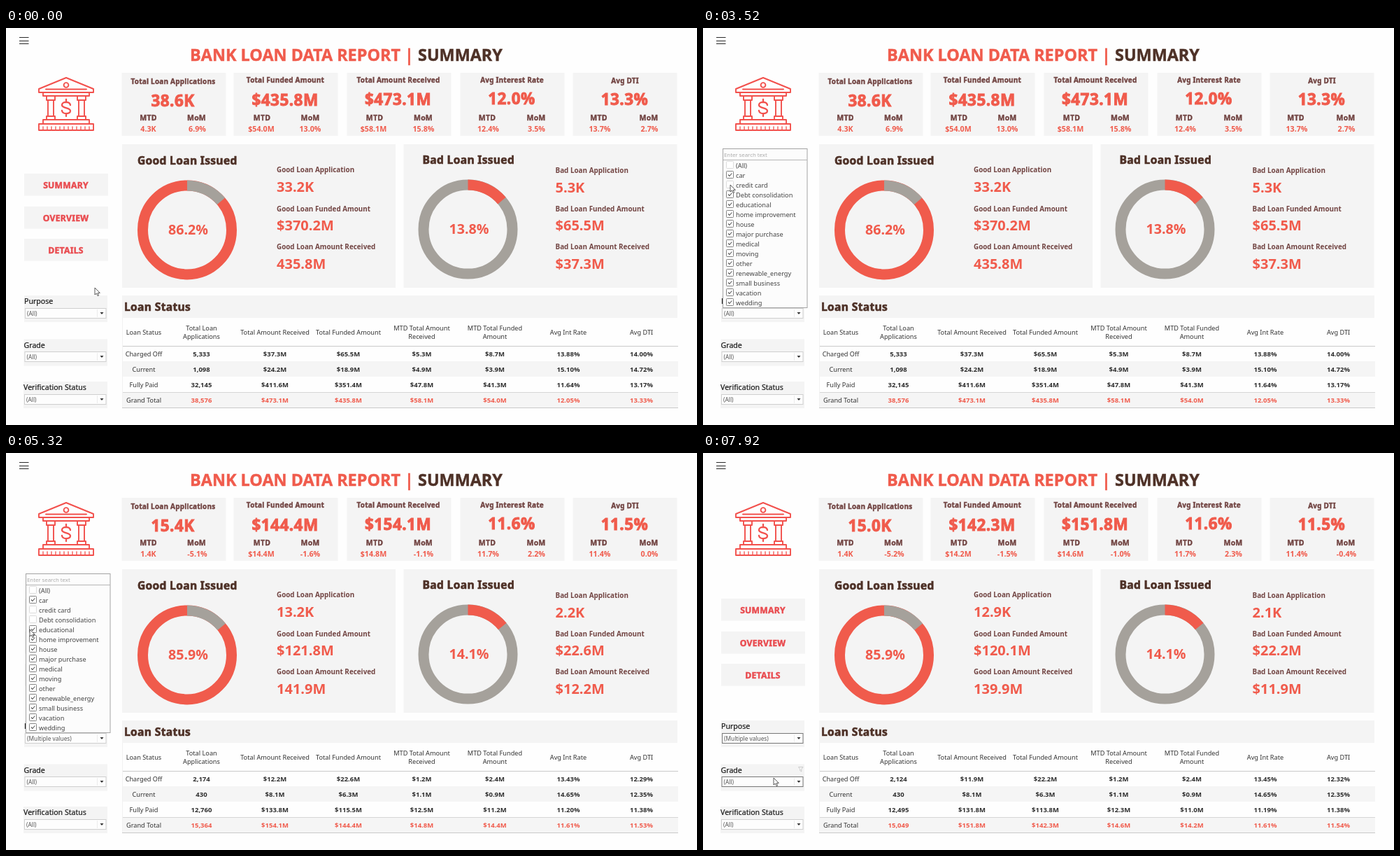
An HTML page for the animation above (7.99 s loop, 988 by 567 pixels).

```html
<!DOCTYPE html>
<html lang="en">
<head>
<meta charset="utf-8">
<title>Bank loan data report</title>
<style>
  html, body { margin: 0; width: 100%; height: 100%; overflow: hidden; background: #fefefe; }
  svg { display: block; width: 100vw; height: 100vh; }
  text { font-family: "Noto Sans", "Open Sans", sans-serif; white-space: pre; }
  .medium { stroke: currentColor; stroke-width: .2px; }
  .semi { font-weight: 600; }
  .bold { font-weight: 700; }
  .heavy { font-weight: 700; stroke: currentColor; stroke-width: .042em; letter-spacing: .02em; }
  .title { font-weight: 700; stroke: currentColor; stroke-width: .02em; }
</style>
</head>
<body>
<svg id="stage" viewBox="0 0 988 567"></svg>
<script>
const LOOP = 7990;
const RED = '#f05b4c', BROWN = '#4e3127', PLUM = '#724543', PANEL = '#f4f4f4', GRAY = '#a5a19b';
const stage = document.getElementById('stage');

function add(tag, attrs, parent = stage) {
  const el = document.createElementNS('http://www.w3.org/2000/svg', tag);
  for (const key in attrs) el.setAttribute(key, attrs[key]);
  parent.append(el);
  return el;
}

const rect = (x, y, width, height, fill, parent, more) =>
  add('rect', { x, y, width, height, fill, ...more }, parent);

const line = (d, stroke, width = 1, parent = stage) =>
  add('path', { d, stroke, 'stroke-width': width, fill: 'none' }, parent);

// y is the middle of the capitals
function label(str, x, y, size, color, { weight = '', anchor = 'middle', parent } = {}) {
  const el = add('text', {
    x, y: y + size * 0.357, 'font-size': size, fill: color, color,
    class: weight, 'text-anchor': anchor
  }, parent);
  el.textContent = str;
  return el;
}

const show = (el, on) => el.setAttribute('visibility', on ? 'visible' : 'hidden');

// ---- data: figures shown for each filter selection
const parse = s => s.trim().split(/\s+/);
const states = [
  { cards: '38.6K 4.3K 6.9% $435.8M $54.0M 13.0% $473.1M $58.1M 15.8% 12.0% 12.4% 3.5% 13.3% 13.7% 2.7%',
    loans: '86.2% 33.2K $370.2M 435.8M 13.8% 5.3K $65.5M $37.3M',
    table: `5,333 $37.3M $65.5M $5.3M $8.7M 13.88% 14.00%
            1,098 $24.2M $18.9M $4.9M $3.9M 15.10% 14.72%
            32,145 $411.6M $351.4M $47.8M $41.3M 11.64% 13.17%
            38,576 $473.1M $435.8M $58.1M $54.0M 12.05% 13.33%` },
  { cards: '33.6K 3.5K 1.4% $376.9M $43.7M 6.2% $407.9M $46.6M 8.2% 12.1% 12.3% 2.6% 13.1% 13.4% 2.5%',
    loans: '85.6% 28.8K $318.0M 374.6M 14.4% 4.8K $58.8M $33.2M',
    table: `4,825 $33.2M $58.8M $4.4M $7.3M 13.92% 13.86%
            997 $21.7M $16.9M $4.0M $3.2M 15.06% 14.51%
            27,756 $352.9M $301.1M $38.2M $33.2M 11.67% 12.96%
            33,578 $407.9M $376.9M $46.6M $43.7M 12.10% 13.13%` },
  { cards: '15.4K 1.4K -5.1% $144.4M $14.4M -1.6% $154.1M $14.8M -1.1% 11.6% 11.7% 2.2% 11.5% 11.4% 0.0%',
    loans: '85.9% 13.2K $121.8M 141.9M 14.1% 2.2K $22.6M $12.2M',
    table: `2,174 $12.2M $22.6M $1.2M $2.4M 13.43% 12.29%
            430 $8.1M $6.3M $1.1M $0.9M 14.65% 12.35%
            12,760 $133.8M $115.5M $12.5M $11.2M 11.20% 11.38%
            15,364 $154.1M $144.4M $14.8M $14.4M 11.61% 11.53%` },
  { cards: '15.0K 1.4K -5.2% $142.3M $14.2M -1.5% $151.8M $14.6M -1.0% 11.6% 11.7% 2.3% 11.5% 11.4% -0.4%',
    loans: '85.9% 12.9K $120.1M 139.9M 14.1% 2.1K $22.2M $11.9M',
    table: `2,124 $11.9M $22.2M $1.2M $2.4M 13.45% 12.32%
            430 $8.1M $6.3M $1.1M $0.9M 14.65% 12.35%
            12,495 $131.8M $113.8M $12.3M $11.0M 11.19% 11.38%
            15,049 $151.8M $142.3M $14.6M $14.2M 11.61% 11.54%` }
].map(s => ({ cards: parse(s.cards), loans: parse(s.loans), table: parse(s.table) }));

// some cards refresh before the rest of the sheet
const partial = { ...states[2], cards: states[2].cards.slice() };
for (const i of [0, 5, 6]) partial.cards[i] = states[3].cards[i];

// ---- header
line('M19 13.5H32.5M19 18.5H32.5M19 22.5H32.5', '#2a2a2a', 1.2);
const title = label('BANK LOAN DATA REPORT | ', 486.5, 38.5, 23.4, RED, { weight: 'title' });
add('tspan', { fill: BROWN, color: BROWN, stroke: BROWN }, title).textContent = 'SUMMARY';

// ---- bank icon
const icon = add('g', { fill: 'none', stroke: '#f2504c', 'stroke-width': 1.9, 'stroke-linejoin': 'round', 'stroke-linecap': 'round' });
add('path', { d: 'M47 87L86 71L125 87V92H47ZM57 87.5H115M53 92V97H119V92' }, icon);
add('circle', { cx: 86, cy: 81.5, r: 3.4 }, icon);
for (const x of [58, 102]) add('path', { d: `M${x} 97V103H${x + 12}V97M${x + 2} 103V126M${x + 10} 103V126M${x} 131V126H${x + 12}V131` }, icon);
add('path', { d: 'M53 137V131H119V137M47 146V137H125V146Z' }, icon);
for (let x = 53; x < 122; x += 6) add('path', { d: `M${x} 141V145`, 'stroke-width': 1.3 }, icon);
add('path', { d: 'M92 110C91 104.5 80 104.5 80 110C80 115.5 92 112.5 92 118.5C92 123.5 80.5 123.5 80 118M86 102V106M86 122.5V126', 'stroke-width': 2.3 }, icon);

// ---- navigation
[['SUMMARY', 208], ['OVERVIEW', 255], ['DETAILS', 301]].forEach(([name, y]) => {
  rect(26, y, 120, 31.5, PANEL);
  label(name, 85.5, y + 16.5, 12.2, '#e94c50', { weight: 'heavy' });
});

// ---- KPI cards: title, left edge, centre, title y, value y, sub label and sub value centres
const cardSlots = [
  ['Total Loan Applications', 165.5, 239, 76, 104, 203.5, 272.5, 203.5, 273.5],
  ['Total Funded Amount', 325.5, 399.5, 74.5, 102.5, 366, 435, 365, 435],
  ['Total Amount Received', 487.5, 561, 74, 101.5, 527, 596.5, 525.5, 597],
  ['Avg Interest Rate', 649.5, 723.5, 74.5, 101, 688, 758, 689.5, 758.5],
  ['Avg DTI', 810.5, 885, 75, 101.5, 847.5, 919, 849, 920]
].flatMap(([name, left, cx, titleY, valueY, mtd, mom, mtdValue, momValue]) => {
  rect(left, 64, 149, 90, PANEL);
  label(name, cx, titleY, 10, PLUM, { weight: 'heavy' });
  label('MTD', mtd, 128.5, 10.5, PLUM, { weight: 'heavy' });
  label('MoM', mom, 128.5, 10.5, PLUM, { weight: 'heavy' });
  return [
    label('', cx - 0.5, valueY, 22.5, RED, { weight: 'heavy' }),
    label('', mtdValue, 144.5, 10.7, RED, { weight: 'bold' }),
    label('', momValue, 144.5, 10.7, RED, { weight: 'bold' })
  ];
});

// ---- good and bad loan panels
function loanPanel(kind, left, titleX, titleY, cx, cy, textX, firstY, base, slice) {
  rect(left, 166, 391, 205, PANEL);
  label(kind + ' Loan Issued', titleX, titleY, 15.6, BROWN, { weight: 'heavy', anchor: 'start' });
  const ring = { cx, cy, r: 63.5, 'stroke-width': 15, fill: 'none' };
  add('circle', { ...ring, stroke: base });
  const arc = add('circle', { ...ring, stroke: slice, pathLength: 100, transform: `rotate(-90 ${cx} ${cy})` });
  const slots = [label('', cx + 1.5, cy - 0.5, 19.7, RED, { weight: 'bold' })];
  ['Application', 'Funded Amount', 'Amount Received'].forEach((name, i) => {
    const y = [firstY, 258, 312.5][i];
    label(`${kind} Loan ${name}`, textX, y, 9.9, PLUM, { weight: 'bold', anchor: 'start' });
    slots.push(label('', textX, y + 24.3, 20, RED, { weight: 'bold', anchor: 'start' }));
  });
  return { arc, slots };
}
const good = loanPanel('Good', 166, 188, 189.5, 259, 288.4, 387, 202.5, RED, GRAY);
const bad = loanPanel('Bad', 568.5, 595.5, 188.5, 660.5, 287.6, 785.5, 203.5, GRAY, RED);
const loanSlots = [...good.slots, ...bad.slots];

// ---- status table
rect(166, 382, 794, 32, PANEL);
label('Loan Status', 169, 398.5, 15.6, BROWN, { weight: 'heavy', anchor: 'start' });
rect(166, 476, 795, 22, '#f5f5f5');
rect(166, 520, 795, 22, '#f5f5f5');
line('M166 454.5H961M166 542.5H961', '#c9c9c9');
line('M166 520.5H961', '#d6d6d6');
line('M166.5 414V542', '#f1f1f1');

const columns = [197, 279.5, 384.5, 489.5, 594.5, 699, 804, 908.5];
['Loan Status', 'Total Loan|Applications', 'Total Amount Received', 'Total Funded Amount',
 'MTD Total Amount|Received', 'MTD Total Funded|Amount', 'Avg Int Rate', 'Avg DTI'].forEach((head, c) => {
  const lines = head.split('|');
  lines.forEach((part, i) => label(part, columns[c], 435 + (i - (lines.length - 1) / 2) * 12, 9.2, '#333'));
});
const tableSlots = ['Charged Off', 'Current', 'Fully Paid', 'Grand Total'].flatMap((name, r) => {
  const y = 465.5 + r * 22;
  label(name, columns[0], y + 0.3, 9.2, '#333');
  return columns.slice(1).map(x => label('', x, y - 0.3, 9.5, r === 3 ? RED : '#2d2d2d', { weight: 'semi' }));
});

// ---- filters
function filter(name, x, top, selectY) {
  rect(x, top, 145 - x, 38, PANEL);
  label(name, x, top + 8.5, 10.6, '#1a1a1a', { weight: 'medium', anchor: 'start' });
  const box = rect(x + 1.5, selectY + 0.5, 141.5 - x, 14, '#fdfdfd', stage, { stroke: '#cfcfcf' });
  line(`M130.5 ${selectY + 2}V${selectY + 13}`, '#ececec');
  add('path', { d: `M134.5 ${selectY + 6}h5l-2.5 3z`, fill: '#333' });
  const value = label('(All)', x + 4, selectY + 7.8, 8.3, '#555', { anchor: 'start' });
  return { box, value };
}
const purpose = filter('Purpose', 26, 382, 400);
const grade = filter('Grade', 25.5, 444.5, 462);
filter('Verification Status', 25, 505, 523);
const funnel = add('path', { d: 'M136.5 448.5H143L140.8 451.5V455L138.7 453.5V451.5Z', fill: 'none', stroke: '#c8c8c8', 'stroke-width': 0.9 });

// ---- purpose drop-down
const menu = add('g', {});
rect(28.5, 172.5, 120.5, 227, '#fcfcfc', menu, { stroke: '#a3a3a3' });
line('M29 188.5H149', '#b5b5b5', 1, menu);
label('Enter search text', 30, 181, 7.8, '#aaa', { anchor: 'start', parent: menu });
const caret = line('M30.5 176V186', '#222', 1, menu);
const checks = ['(All)', 'car', 'credit card', 'Debt consolidation', 'educational', 'home improvement', 'house',
  'major purchase', 'medical', 'moving', 'other', 'renewable_energy', 'small business', 'vacation', 'wedding'
].map((name, i) => {
  const y = 196 + i * 14;
  label(name, 47, y + 0.5, 9.2, '#444', { anchor: 'start', parent: menu });
  const box = rect(33.5, y - 5.5, 10, 10, '#fff', menu, { rx: 0.8 });
  const tick = line(`M36 ${y - 0.5}l1.9 2l3.4 -4`, '#555', 1.1, menu);
  return { box, tick };
});

// ---- pointer
const glow = add('circle', { r: 9.3, fill: '#f7ea30', opacity: 0.85 });
const pointer = add('path', { d: 'M0 0V10L2.4 8L4.1 11.6L5.7 10.9L4.1 7.4H7.3Z', fill: '#fff', stroke: '#333', 'stroke-width': 0.8 });

// each path: points of time, x, y; the pointer is out of sight between paths
const trips = [
  { end: 50, points: [[0, 127, 371]] },
  { start: 530, end: 6630, points: [
    [530, 221, 392], [950, 139, 404], [1540, 139, 404], [2300, 44, 223], [2440, 39, 224],
    [3720, 39, 224], [4060, 37.5, 235], [5100, 37.5, 235], [5320, 34, 252], [5540, 35, 256],
    [5730, 37, 256], [5940, 38, 252], [6220, 38, 252], [6630, -8, 312]] },
  { start: 7640, end: LOOP, points: [[7640, -4, 366], [7920, 101, 464]] }
];
const clicks = [[1000, 1140], [2640, 2710], [4330, 4400], [6010, 6080]];
const unchecked = [[0, 3520], [2, 3520], [3, 4860], [4, 7030]];
const updates = [[0, states[0]], [3590, states[1]], [4930, states[2]], [7030, partial], [7160, states[3]]];

function locate(points, t) {
  const next = points.findIndex(p => p[0] > t);
  if (next < 1) return points[next < 0 ? points.length - 1 : 0].slice(1);
  const [a, b] = [points[next - 1], points[next]];
  const u = (t - a[0]) / (b[0] - a[0]), k = u * u * (3 - 2 * u);
  return [a[1] + (b[1] - a[1]) * k, a[2] + (b[2] - a[2]) * k];
}

let shown;
function fill(state) {
  if (state === shown) return;
  shown = state;
  const write = (slots, values) => slots.forEach((el, i) => { el.textContent = values[i]; });
  write(cardSlots, state.cards);
  write(loanSlots, state.loans);
  write(tableSlots, state.table);
  const share = parseFloat(state.loans[4]);
  for (const { arc } of [good, bad]) arc.setAttribute('stroke-dasharray', `${share} ${100 - share}`);
  purpose.value.textContent = state === states[0] ? '(All)' : '(Multiple values)';
}

function render(t) {
  fill(updates.filter(([from]) => t >= from).pop()[1]);

  const open = t >= 1070 && t < 7440;
  menu.style.display = open ? '' : 'none';
  show(caret, t < 1600);
  checks.forEach(({ box, tick }, i) => {
    const on = !unchecked.some(([row, from]) => row === i && t >= from);
    box.setAttribute('stroke', on ? '#858585' : '#dcdcdc');
    show(tick, on);
  });

  const hover = t >= 7850;
  purpose.box.setAttribute('stroke', t >= 7440 ? '#777' : '#cfcfcf');
  grade.box.setAttribute('stroke', hover ? '#777' : '#cfcfcf');
  show(funnel, hover);

  const trip = trips.find(({ start = 0, end }) => t >= start && t < end);
  show(pointer, trip);
  show(glow, trip && clicks.some(([on, off]) => t >= on && t < off));
  if (trip) {
    const [x, y] = locate(trip.points, t);
    pointer.setAttribute('transform', `translate(${x} ${y})`);
    glow.setAttribute('cx', x);
    glow.setAttribute('cy', y + 0.8);
  }
}

const began = performance.now();
function tick() {
  render((performance.now() - began) % LOOP);
  requestAnimationFrame(tick);
}
tick();
</script>
</body>
</html>
```
